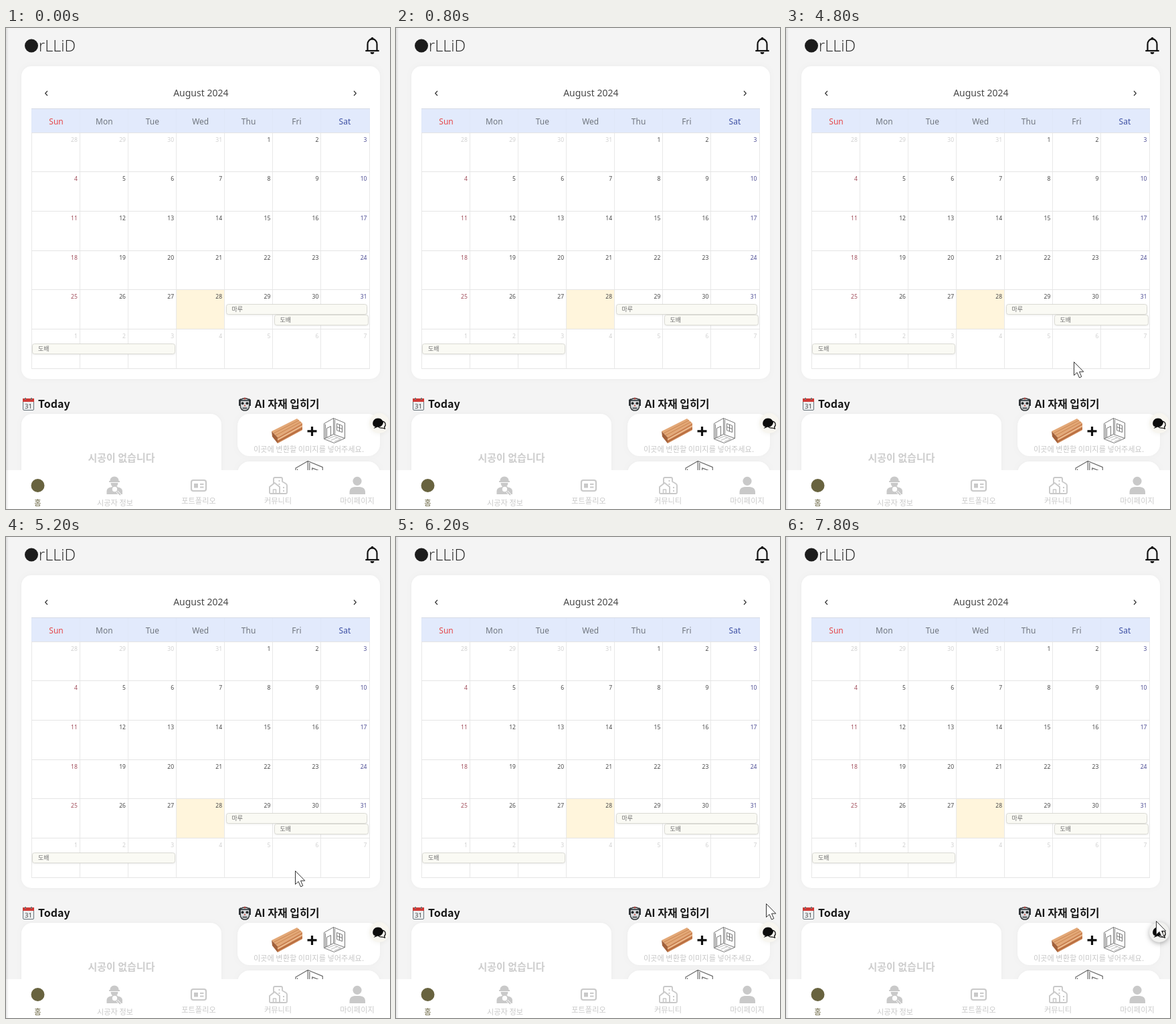
An HTML page with a canvas for the animation above (8 s loop, 574x718 px).

```html
<!DOCTYPE html>
<html lang="ko">
<head>
<meta charset="utf-8">
<title>Home calendar</title>
<style>
html, body { margin: 0; width: 100%; height: 100%; overflow: hidden; background: #f4f4f4; }
canvas { display: block; width: 574px; height: 718px; }
</style>
</head>
<body>
<canvas id="stage"></canvas>
<script>
const W = 574, H = 718, LOOP = 8000, STEP = 200;
const canvas = document.getElementById('stage');
const ctx = canvas.getContext('2d');
const ratio = window.devicePixelRatio || 1;
canvas.width = W * ratio;
canvas.height = H * ratio;

const LATIN = '"Noto Sans", "Open Sans", sans-serif';
const KOREAN = '"Noto Sans CJK KR", "Noto Sans CJK", "Noto Sans CJK JP", sans-serif';
const GREY = '#c9c9c9';

function text(str, x, y, size, color, { font = KOREAN, weight = 400, align = 'left' } = {}) {
  ctx.font = `${weight} ${size}px ${font}`;
  ctx.fillStyle = color;
  ctx.textAlign = align;
  ctx.fillText(str, x, y);
}

function rect(x, y, w, h, color) {
  ctx.fillStyle = color;
  ctx.fillRect(x, y, w, h);
}

function box(x, y, w, h, r, fill, stroke, width = 1) {
  ctx.beginPath();
  ctx.roundRect(x, y, w, h, r);
  paint(fill, stroke, width);
}

function paint(fill, stroke, width = 1) {
  if (fill) { ctx.fillStyle = fill; ctx.fill(); }
  if (stroke) { ctx.strokeStyle = stroke; ctx.lineWidth = width; ctx.stroke(); }
}

function disc(x, y, r, fill, stroke, width) {
  ctx.beginPath();
  ctx.arc(x, y, r, 0, Math.PI * 2);
  paint(fill, stroke, width);
}

function shape(d, fill, stroke, width = 1) {
  const p = new Path2D(d);
  if (fill) { ctx.fillStyle = fill; ctx.fill(p); }
  if (stroke) { ctx.strokeStyle = stroke; ctx.lineWidth = width; ctx.stroke(p); }
}

function at(x, y, scale, draw) {
  ctx.save();
  ctx.translate(x, y);
  ctx.scale(scale, scale);
  draw();
  ctx.restore();
}

function withShadow(color, blur, dy, draw) {
  ctx.save();
  ctx.shadowColor = color;
  ctx.shadowBlur = blur * ratio;
  ctx.shadowOffsetY = dy * ratio;
  draw();
  ctx.restore();
}

function card(x, y, w, h, r) {
  withShadow('rgba(0,0,0,.03)', 5, 0, () => box(x, y, w, h, r, '#fff'));
}

function header() {
  disc(38, 26.5, 10, '#1c1c1c');
  text('rLLiD', 49, 35, 23.5, '#222', { font: '"Open Sans", "Noto Sans", sans-serif', weight: 300 });
  shape('M540.5 33.5V24.5C540.5 13.7 554.5 13.7 554.5 24.5V33.5', null, '#111', 2.2);
  shape('M537.3 34H557.7', null, '#111', 2.2);
  disc(547.5, 15.6, 1.9, '#111');
  shape('M544.6 36H550.4A2.9 2.9 0 0 1 544.6 36Z', '#111');
}

const GRID = { x: 38.4, y: 156.2, cw: 72.1, rh: 58.65 };

function dateColor(col, day) {
  if (day < 1 || day > 31) return '#d0d0d0';
  if (col === 0) return '#a04c5a';
  return col === 6 ? '#4c4c94' : '#484848';
}

function calendar() {
  card(23, 57, 536, 467, 15);
  text('August 2024', 291.3, 102, 14, '#484848', { font: LATIN, align: 'center' });
  shape('M62 94L58.7 97.5L62 101', null, '#333', 1.2);
  shape('M520 94L523.3 97.5L520 101', null, '#333', 1.2);

  const { x, y, cw, rh } = GRID;
  rect(38, 120, 506, 36, '#e2eafc');
  rect(255, 391, 71, 58, '#fff5dc');
  for (let c = 0; c <= 7; c++) {
    const lx = Math.floor(x + c * cw);
    rect(lx, 121, 1, 36, '#dfe7f8');
    rect(lx, 156, 1, 353, '#e8e8e8');
  }
  for (let r = 0; r <= 6; r++) rect(38, Math.floor(y + r * rh), 506, 1, '#e5e5e5');
  rect(38, 120, 506, 1, '#d6dbe6');

  ['Sun', 'Mon', 'Tue', 'Wed', 'Thu', 'Fri', 'Sat'].forEach((name, c) => {
    const color = c === 0 ? '#e5484a' : c === 6 ? '#3d4fa3' : '#70767f';
    text(name, 75 + c * 71.9, 144, 12, color, { font: LATIN, weight: 300, align: 'center' });
  });

  for (let i = 0; i < 42; i++) {
    const c = i % 7, r = Math.floor(i / 7), day = i - 3;
    const label = day < 1 ? day + 31 : day > 31 ? day - 31 : day;
    const baseline = Math.round(y + 13.4 + r * rh);
    text(label, x + (c + 1) * cw - 3.6, baseline, 8.6, dateColor(c, day), { font: LATIN, align: 'right' });
  }

  [['마루', 329.5, 412.5, 210, 15, 337.5],
   ['도배', 401.5, 428.5, 140, 15, 409.5],
   ['도배', 39.5, 471.5, 213, 15, 48]].forEach(([name, bx, by, w, h, tx]) => {
    withShadow('rgba(0,0,0,.09)', 3, 1, () => box(bx, by, w, h, 3, '#fafaf4'));
    box(bx, by, w, h, 3, null, '#dadad4');
    text(name, tx, by + 10.5, 9, '#707070');
  });
}

function calendarIcon() {
  box(25.5, 553.5, 16, 17, 1.5, '#eceff0', '#68737a');
  rect(25, 553, 17, 5, '#cf3a36');
  rect(28, 552, 2, 3, '#777');
  rect(37, 552, 2, 3, '#777');
  text('31', 33.5, 568, 9.5, '#444', { font: LATIN, align: 'center' });
}

function robotIcon() {
  shape('M348 555L351 553L353 557L351 564H348ZM366 555L363 553L361 557L363 564H366Z', '#33383c');
  shape('M350 558Q350 553 357 553Q364 553 364 558L363.5 566Q362 571 357 571Q352 571 350.5 566Z', '#d9dcde', '#2c3033', 1.4);
  rect(351, 555, 12, 2, '#4a5156');
  disc(357, 553, 1.6, '#a8443f');
  for (const ex of [353.6, 360.4]) disc(ex, 560.3, 2, '#24282b');
  shape('M357 562L358.6 564.6H355.4Z', '#c74a42');
  rect(353.5, 566.5, 7, 2, '#4a5156');
}

function plank() {
  shape('M397 602L435 583L443 590L406 611Z', '#e3a877');
  shape('M406 611L443 590V600L406 620Z', '#cc8250');
  shape('M397 602L406 611V620L398 610Z', '#a2613b');
  shape('M400 605L438 585.5M403 608L441 588', null, '#c98552', 1);
  shape('M406 614.5L443 594', null, '#f0c49a', 1.6);
  shape('M406 617.5L443 597.5', null, '#a35c35', 1);
}

function room() {
  shape('M0 8L14 0L31 7V30L15 37L0 31ZM14 0V24L0 31M14 24L31 30M2 9V30M16 2V24', null, '#686868', .9);
  shape('M4 29V15L10 12V26M19 8L27 11V21L19 18ZM23 9.5V19.5M19 13L27 16', null, '#686868', .9);
  shape('M5 31L15 27L25 31M10 33L20 29M15 35L25 31', null, '#999', .7);
}

function sections() {
  calendarIcon();
  text('Today', 48, 567, 16, '#161616', { weight: 700 });
  robotIcon();
  text('AI 자재 입히기', 372, 567, 16, '#161616', { weight: 700 });

  card(23, 576, 299, 130, 16);
  text('시공이 없습니다', 172.5, 646.5, 15, '#cdcdcd', { weight: 700, align: 'center' });

  card(346, 576, 213, 63, 18);
  plank();
  rect(450.5, 600.2, 14, 3.2, '#111');
  rect(455.9, 595, 3.2, 14, '#111');
  at(475.5, 582.5, 1, room);
  text('이곳에 변환할 이미지를 넣어주세요.', 452.5, 632.5, 11.2, '#c6c6c6', { align: 'center' });

  card(346, 647, 213, 63, 18);
  at(433, 646.5, 1.3, room);
}

function chatButton(hover) {
  withShadow(hover ? 'rgba(0,0,0,.3)' : 'rgba(90,80,40,.07)', hover ? 7 : 6, hover ? 2 : 1, () =>
    disc(558, 590, 15, hover ? '#f1f1ef' : '#f8f6f0'));
  shape('M556 582.5C546.5 582.5 546.5 595.5 552 595L549.5 598L556 595.6C566 595.6 566 582.5 556 582.5Z', '#0c0c0c');
  shape('M563.5 587C568 588.5 568 594 565.5 595.5L566.5 598.3L562.5 597C559.5 597.3 557.5 596.2 556.6 595.3C561 595 563.7 591.5 563.5 587Z', '#f7f5ef', '#0c0c0c', 1.2);
}

function workerIcon() {
  shape('M155.5 676Q155.5 670 162 669.5Q168.5 670 168.5 676H170V678H154V676Z', GREY);
  shape('M156.5 679H167.5Q167 685 162 685Q157 685 156.5 679Z', GREY);
  shape('M150.5 696V691Q151 686 157 685.5H167Q173.5 686 174 691V696Z', GREY);
  disc(162.5, 688.5, 4.6, '#fff', GREY, 1.8);
  shape('M166 692L171 697', null, '#fff', 3.6);
  shape('M166 692L171 697', null, GREY, 2);
}

function cardIcon() {
  box(277, 675, 22, 16, 3, null, GREY, 2.2);
  rect(281, 680, 6, 6.5, GREY);
  rect(290, 680, 5.5, 2, GREY);
  rect(290, 684.5, 5.5, 2, GREY);
}

function buildingIcon() {
  shape('M400 680V673Q400 671 402 671H411Q413 671 413 673V677L418 680Q420 681 420 683V693Q420 695 418 695H395.5Q394 695 394 693.5V685L401.5 679L409 685V695', null, GREY, 1.9);
  shape('M399.5 695V689H403.5V695', null, GREY, 1.6);
  for (const wy of [675, 680, 685, 690]) rect(wy < 682 ? 407.5 : 414, wy, 2, 2, GREY);
}

function personIcon() {
  disc(525, 676.3, 6.6, GREY);
  shape('M513.5 696V692Q514 685.5 521 685H529Q536.5 685.5 537 692V696Z', GREY);
}

function navBar() {
  rect(0, 660, W, 58, '#fff');
  disc(47.5, 683, 10, '#68633f');
  workerIcon();
  cardIcon();
  buildingIcon();
  personIcon();
  [['홈', 47.5, 713, '#68633f'],
   ['시공자 정보', 163, 712.6, GREY],
   ['포트폴리오', 288, 710.3, GREY],
   ['커뮤니티', 406.5, 710.3, GREY],
   ['마이페이지', 525, 710.3, GREY]].forEach(([name, x, y, color]) =>
    text(name, x, y, 11.2, color, { align: 'center' }));
}

function leftEdge() {
  const g = ctx.createLinearGradient(0, 0, 4, 0);
  g.addColorStop(0, 'rgba(0,0,0,.1)');
  g.addColorStop(1, 'rgba(0,0,0,0)');
  rect(0, 0, 4, H, g);
}

// Pointer path: time, x, y
const PATH = [
  [4400, 519, 541], [4600, 452, 509], [4800, 430, 498], [5200, 432, 498],
  [5600, 437, 497], [5800, 505, 527], [6000, 553, 547], [7200, 553, 547],
  [7400, 553, 553], [7600, 553, 566], [7800, 553, 573]
];

function pointerAt(t) {
  if (t < PATH[0][0]) return null;
  const i = PATH.findIndex(p => p[0] > t);
  if (i < 0) return PATH[PATH.length - 1].slice(1);
  const [t0, x0, y0] = PATH[i - 1], [t1, x1, y1] = PATH[i];
  const k = (t - t0) / (t1 - t0);
  return [x0 + (x1 - x0) * k, y0 + (y1 - y0) * k];
}

function pointer([x, y]) {
  at(x + .5, y + .5, 1, () =>
    shape('M0 0V20L4.6 15.8L8 23.5L11.3 22L8 14.6H14.3Z', '#fff', '#333', 1));
}

function draw(t) {
  ctx.setTransform(ratio, 0, 0, ratio, 0, 0);
  ctx.lineJoin = 'round';
  rect(0, 0, W, H, '#f4f4f4');
  header();
  calendar();
  sections();
  const pos = pointerAt(t);
  chatButton(pos && Math.hypot(pos[0] - 558, pos[1] - 590) < 18);
  navBar();
  leftEdge();
  if (pos) pointer(pos);
}

const start = performance.now();
function tick() {
  const t = (performance.now() - start) % LOOP;
  draw(Math.floor(t / STEP) * STEP);
  requestAnimationFrame(tick);
}
tick();
</script>
</body>
</html>
```
